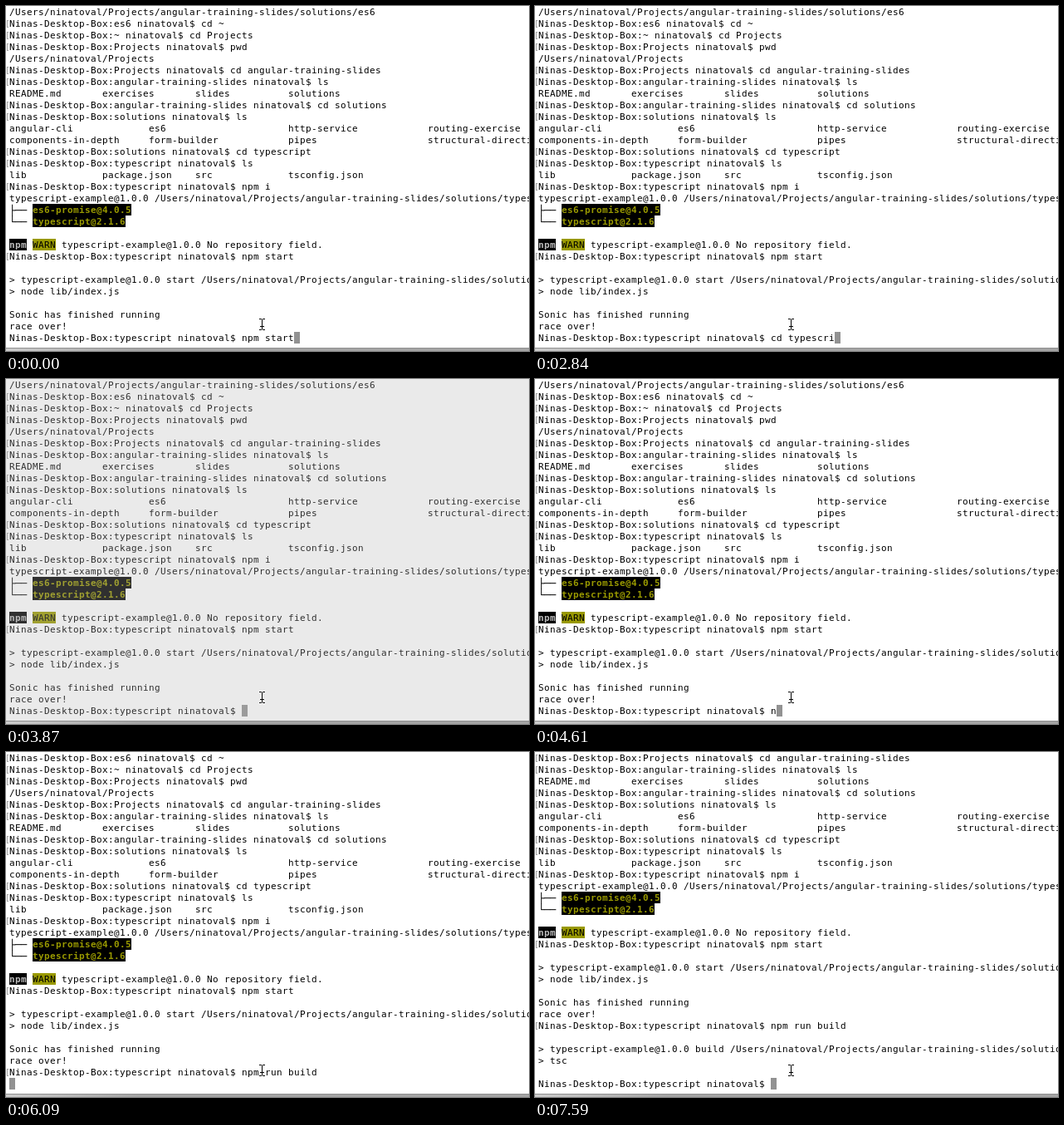
Write an HTML page with a canvas that moves like this. It is 630 px wide and 415 px high and loops after 8 s.

```html
<!DOCTYPE html>
<html lang="en">
<head>
<meta charset="utf-8">
<title>Terminal</title>
<style>
html, body { margin: 0; width: 100%; height: 100%; overflow: hidden; background: #fff; }
canvas { display: block; }
</style>
</head>
<body>
<canvas id="stage" width="630" height="415"></canvas>
<script>
const ctx = document.getElementById('stage').getContext('2d');
const LOOP = 8000, CELL = 7, ROW = 14, LEFT = 4, LAST = 28;
const FONT = '"DejaVu Sans Mono", monospace';
const HOST = 'Ninas-Desktop-Box', USER = 'ninatoval';
const OLIVE = '#999900';
const REPO = `/Users/${USER}/Projects/angular-training-slides`;
const SLIDES = 'angular-training-slides';

const prompt = (dir, cmd = '') => `${HOST}:${dir} ${USER}$ ${cmd}`;
const columns = (width, ...names) => names.map(n => n.padEnd(width)).join('');
const script = (name, cmd) => [
  '', `> typescript-example@1.0.0 ${name} ${REPO}/solutions/typescript`, `> ${cmd}`, ''
];

const history = [
  `${REPO}/solutions/es6`,
  prompt('es6', 'cd ~'),
  prompt('~', 'cd Projects'),
  prompt('Projects', 'pwd'),
  `/Users/${USER}/Projects`,
  prompt('Projects', `cd ${SLIDES}`),
  prompt(SLIDES, 'ls'),
  columns(16, 'README.md', 'exercises', 'slides', 'solutions'),
  prompt(SLIDES, 'cd solutions'),
  prompt('solutions', 'ls'),
  columns(24, 'angular-cli', 'es6', 'http-service', 'routing-exercise'),
  columns(24, 'components-in-depth', 'form-builder', 'pipes', 'structural-directives'),
  prompt('solutions', 'cd typescript'),
  prompt('typescript', 'ls'),
  columns(16, 'lib', 'package.json', 'src', 'tsconfig.json'),
  prompt('typescript', 'npm i'),
  `typescript-example@1.0.0 ${REPO}/solutions/typescript`,
  '├── es6-promise@4.0.5',
  '└── typescript@2.1.6',
  '',
  'npm WARN typescript-example@1.0.0 No repository field.',
  prompt('typescript', 'npm start'),
  ...script('start', 'node lib/index.js'),
  'Sonic has finished running',
  'race over!'
];

// Coloured spans: text -> [ink, paper, bold]
const spans = {
  'es6-promise@4.0.5': [OLIVE, '#000', true],
  'typescript@2.1.6': [OLIVE, '#000', true],
  'npm': ['#bfbfbf', '#000', true],
  'WARN': ['#000', OLIVE, false]
};
const spanRows = { 17: ['es6-promise@4.0.5'], 18: ['typescript@2.1.6'], 20: ['npm', 'WARN'] };

// Command line: [start time, text]
const recalled = 'cd typescript', build = 'npm run build';
const input = [
  [0, 'npm start'], [300, 'npm i'], [900, 'ls'], [1500, recalled],
  ...[[2390, 12], [2840, 11], [2990, 9], [3130, 7], [3280, 6], [3430, 4], [3570, 2], [3720, 0]]
    .map(([t, n]) => [t, recalled.slice(0, n)]),
  ...[[4610, 1], [4750, 2], [4900, 3], [5050, 4], [5200, 6], [5500, 7], [5650, 9], [5790, 11], [5940, 13]]
    .map(([t, n]) => [t, build.slice(0, n)])
];
const ENTER = 6090, OUTPUT = 6540, DONE = 7590;

function screen(t) {
  if (t < ENTER) return [...history, prompt('typescript', input.findLast(s => s[0] <= t)[1])];
  const lines = [...history, prompt('typescript', build)];
  if (t >= OUTPUT) lines.push(...script('build', 'tsc'));
  return [...lines, t < DONE ? '' : prompt('typescript')];
}

function box(x, y, w, h, color) {
  ctx.fillStyle = color;
  ctx.fillRect(x, y, w, h);
}

function write(text, col, y, ink = '#000', bold = false) {
  ctx.fillStyle = ink;
  [...text].forEach((ch, i) => {
    if (ch === ' ') return;
    // Line-drawing characters are a size larger so that their strokes join
    const tree = '├└─'.includes(ch);
    ctx.font = `${bold ? 'bold' : ''} ${tree ? 12 : 11}px ${FONT}`;
    ctx.fillText(ch, LEFT + (col + i) * CELL, y + (tree ? 12 : 11));
  });
}

function drawLine(text, index, y) {
  if (text.startsWith(HOST) && y < LAST * ROW) {
    box(1, y + 3, 1, 9, '#a0a0a0');
    box(2, y + 3, 1, 1, '#a0a0a0');
    box(2, y + 11, 1, 1, '#a0a0a0');
  }
  let rest = text;
  for (const span of spanRows[index] || []) {
    const [ink, paper, bold] = spans[span], col = text.indexOf(span);
    box(LEFT + col * CELL, y, span.length * CELL, ROW, paper);
    write(span, col, y, ink, bold);
    rest = rest.replace(span, ' '.repeat(span.length));
  }
  write(rest, 0, y);
}

function drawPointer() {
  for (const [pad, color] of [[1, 'rgba(255,255,255,.6)'], [0, '#000']]) {
    const bar = (x, y, w, h) => box(x - pad, y - pad, w + 2 * pad, h + 2 * pad, color);
    bar(308, 377, 1, 12);
    bar(305, 376, 3, 1);
    bar(309, 376, 3, 1);
    bar(305, 389, 3, 1);
    bar(309, 389, 3, 1);
    bar(306, 385, 5, 1);
  }
}

function drawEdge() {
  const shade = ctx.createLinearGradient(0, 0, 160, 0);
  shade.addColorStop(0, '#cccccc');
  shade.addColorStop(1, '#a4a4a4');
  box(0, 411, 630, 4, shade);
  box(0, 411, 630, 1, '#909090');
}

function draw(t) {
  box(0, 0, 630, 415, '#fff');
  const lines = screen(t), first = lines.length - 1 - LAST;
  const cursor = LEFT + lines.at(-1).length * CELL;
  box(cursor, LAST * ROW, CELL, ROW, '#929292');
  for (let r = 0; r <= LAST; r++) drawLine(lines[first + r], first + r, r * ROW);

  // Visual bell
  const bell = t >= 3870 && t < 4020 ? 0.27 : t >= 4020 && t < 4160 ? 0.13 : 0;
  if (bell) box(0, 0, 630, 411, `rgba(178,178,178,${bell})`);

  drawPointer();
  drawEdge();
}

function tick() {
  draw(performance.now() % LOOP);
  requestAnimationFrame(tick);
}
tick();
</script>
</body>
</html>
```
